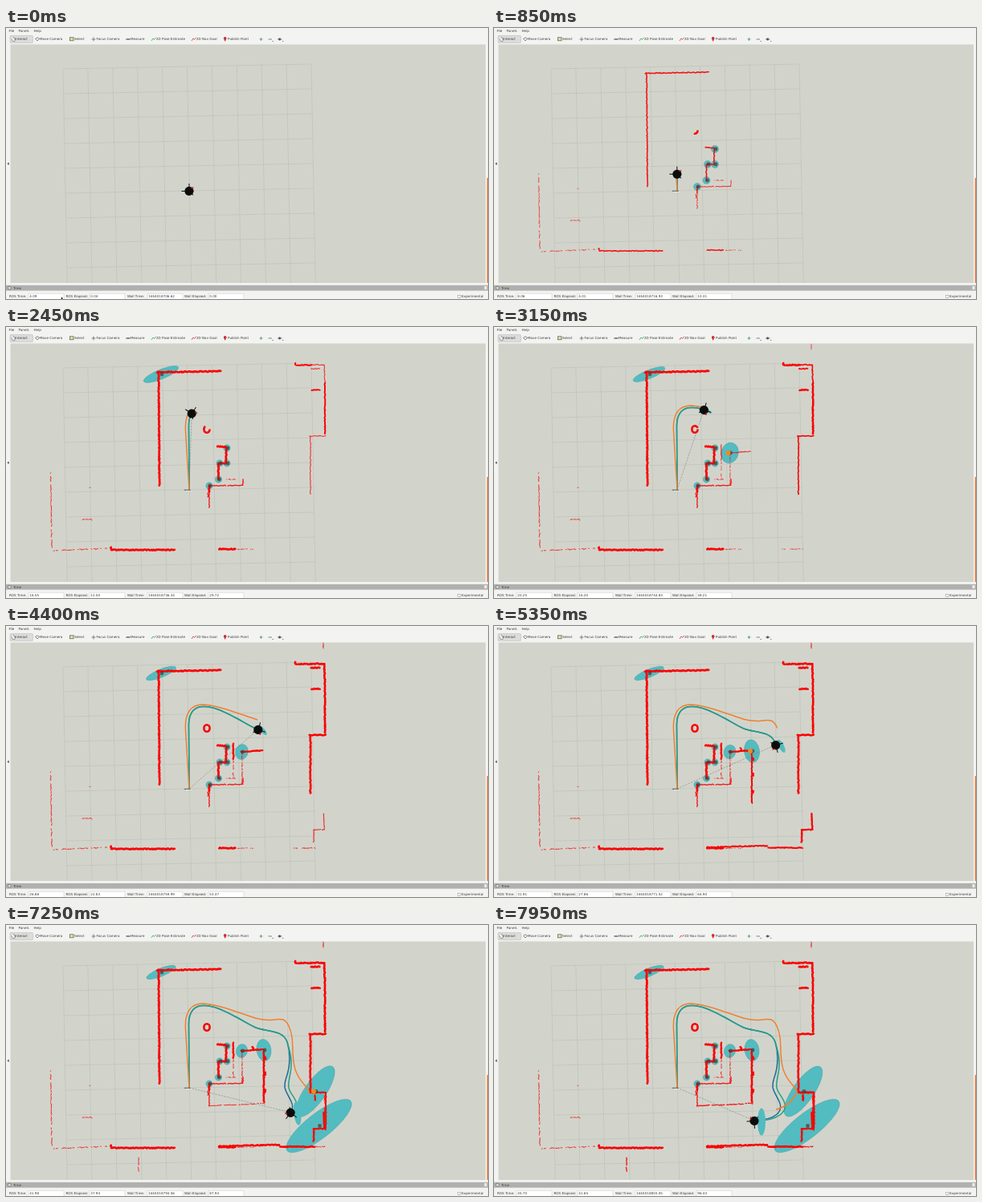
An HTML page that plays this animation: 600x338 px, repeating every 8000 ms.

```html
<!DOCTYPE html>
<html lang="en">
<head>
<meta charset="utf-8">
<title>Robot mapping view</title>
<style>
html, body { margin: 0; width: 100%; height: 100%; overflow: hidden; background: #f3f3f1; }
svg { display: block; width: 100vw; height: 100vh; }
text { font: 4.1px "DejaVu Sans", sans-serif; fill: #3a3a3a; text-rendering: geometricPrecision; }
</style>
</head>
<body>
<svg viewBox="0 0 600 338" preserveAspectRatio="none">
  <defs><clipPath id="view"><rect x="5.5" y="20.5" width="591.5" height="297.5"/></clipPath></defs>
  <rect width="600" height="338" fill="#f3f3f1"/>
  <rect x="5.5" y="20.5" width="591.5" height="297.5" fill="#d2d4cc"/>
  <g clip-path="url(#view)" fill="none">
    <path id="grid" stroke="#bbbfb6" stroke-width=".6"/>
    <g id="areas" fill="#52bcc0" stroke="#3f8f92" stroke-width=".3"></g>
    <g id="walls" stroke="#f80404" stroke-linecap="round"></g>
    <ellipse id="post" cx="250" cy="127.5" rx="3.6" ry="4.3" pathLength="100" stroke="#f80404" stroke-width="2.6"/>
    <g id="dots"></g>
    <path id="link" stroke="#777" stroke-width=".5" stroke-dasharray="2.5 1.2"/>
    <path d="M222 203.3H230M228 199V204" stroke="#333" stroke-width=".8"/>
    <path d="M224 204.3H231" stroke="#f4f4f0" stroke-width=".7"/>
    <g id="routes" stroke-width="1.5"></g>
    <ellipse id="pose" fill="#52bcc0"/>
    <g id="robot">
      <path d="M0 0V-9.5M0 0H-9.5M0 0L5 5" stroke="#111" stroke-width="1"/>
      <circle r="5.6" fill="#0b0d0c"/>
      <path d="M2 -4.5L5.5 -4" stroke="#c62a35" stroke-width="1.5"/>
    </g>
  </g>
  <g fill="none" stroke="#666" stroke-width=".8">
    <rect x="5" y="9.6" width="28.5" height="9" rx="1" fill="#dcdcda" stroke="#b5b5b2" stroke-width=".5"/>
    <path d="M7 13L8 16.5H11V13L9 12V11" fill="#fff" stroke-width=".6"/>
    <path d="M36.5 13.5L39 11.8L41.5 13.5L39 16Z"/>
    <rect x="79.5" y="11.8" width="4.5" height="4" fill="#e8df9b"/>
    <path d="M106.5 14H111.5M109 11.5V16.5"/>
    <path d="M149.5 14H154.5" stroke-width="1.5"/>
    <path d="M181 16L183 13L184.5 14.5L186.5 12" stroke="#22aa44"/>
    <path d="M231 16L233 13L234.5 14.5L236.5 12" stroke="#c33"/>
    <path d="M272.7 17L271 13.5A1.8 1.8 0 1 1 274.4 13.5Z" fill="#c33" stroke="none"/>
    <path d="M315.5 14H319.5M317.5 12V16" stroke="#4d8a70"/>
    <path d="M326.5 14H331M338 14H343.5M331.5 16.5H333M344 16.5H345.5"/>
    <circle cx="340.7" cy="14" r="1.2" fill="#444"/>
  </g>
  <path d="M3.6 167.5L1.5 169.2L3.6 171Z" fill="#444"/>
  <path d="M599.4 187V318" stroke="#f07030" stroke-width="1.2"/>
  <rect y="320.8" width="600" height="6.8" fill="#b0b1ae"/>
  <circle cx="4.3" cy="324.2" r="2" fill="#ddd" stroke="#555" stroke-width=".6"/>
  <rect x="595.5" y="322" width="3" height="4" fill="#ececea"/>
  <path d="M28 331.3h44v8h-44zM104 331.3h44v8h-44zM176 331.3h44v8h-44zM252 331.3h44v8h-44z" fill="#fff" stroke="#c4c4c0" stroke-width=".5"/>
  <rect x="562.3" y="333.2" width="3.5" height="3.5" fill="#fff" stroke="#888" stroke-width=".5"/>
  <g>
    <text x="3.5" y="5">File</text><text x="15.5" y="5">Panels</text><text x="34.5" y="5">Help</text>
    <text x="11" y="15.4">Interact</text><text x="42" y="15.4">Move Camera</text>
    <text x="85" y="15.4">Select</text><text x="112.5" y="15.4">Focus Camera</text>
    <text x="155" y="15.4">Measure</text><text x="187" y="15.4">2D Pose Estimate</text>
    <text x="237" y="15.4">2D Nav Goal</text><text x="276" y="15.4">Publish Point</text>
    <text x="9" y="325.7">Time</text>
    <text x="4" y="336.4">ROS Time:</text><text id="ros" x="29.3" y="336.4"></text>
    <text x="74.5" y="336.4">ROS Elapsed:</text><text id="rosElapsed" x="105.3" y="336.4"></text>
    <text x="151" y="336.4">Wall Time:</text><text id="wall" x="177.3" y="336.4"></text>
    <text x="222" y="336.4">Wall Elapsed:</text><text id="wallElapsed" x="253.3" y="336.4"></text>
    <text x="567" y="336.4">Experimental</text>
  </g>
  <path id="cursor" d="M68.8 335.4L71 337.3L69.8 338H68.8Z" fill="#111"/>
</svg>
<script>
const LOOP = 8000, STEP = 50, DEPART = 400, ARRIVE = 7950;
const $ = id => document.getElementById(id);
const clamp = k => Math.max(0, Math.min(1, k));
const show = (el, on) => el.setAttribute('visibility', on ? 'visible' : 'hidden');

function set(el, attrs) {
  for (const key in attrs) el.setAttribute(key, attrs[key]);
  return el;
}
function add(parent, tag, attrs) {
  return $(parent).appendChild(set(document.createElementNS('http://www.w3.org/2000/svg', tag), attrs));
}

let seed = 11;
function rand() {
  seed = (seed * 16807) % 2147483647;
  return seed / 2147483647;
}

// Ground grid, 10 x 10 cells
let grid = '';
for (let i = 0; i <= 10; i++) {
  grid += `M${71 + 30.9 * i} ${51 - .6 * i}l6 310M${71 + .6 * i} ${51 + 31 * i}l309 -6`;
}
$('grid').setAttribute('d', grid);

// A laser scan: rough lines that thicken over `span`; low density leaves gaps
const scans = [];
function scan(start, span, width, density, outline) {
  let d = '';
  for (const part of outline.match(/M[^M]+/g)) {
    const line = add('walls', 'path', { d: part }), len = line.getTotalLength();
    let last = '';
    for (let s = 0; s <= len; s += 1.3) {
      const p = line.getPointAtLength(s);
      const here = (p.x + rand() - .5).toFixed(1) + ' ' + (p.y + rand() - .5).toFixed(1);
      if (last && rand() < density) d += `M${last}L${here}`;
      last = here;
    }
    line.remove();
  }
  scans.push({ el: add('walls', 'path', { d }), start, span, width });
}
scan(150, 1600, 2.7, 1, 'M190 56L191 198M188 56.5L268 55M131 275V278H211M265 277H287M253 198V206M263 149L274 149.5V170H264.5V191');
scan(150, 1600, 1.4, .9, 'M253 206V226M251.5 207V213M253 198L295 197.5V189');
scan(150, 1600, .9, .6, 'M55.5 180L57 279L131 276M104 200H107M100 220V223M94 240H107V242M274 190H287M287 277H310');
scan(1000, 2300, 2.6, 1, 'M360 45V47.5H382M380 78.5H391M397 70V134');
scan(2000, 2200, 2.6, 1, 'M382 47H396L397 70M380 52H391M378 136H398M379 136V209');
scan(2700, 1600, 2.3, 1, 'M283 147V167M293 157L320 155');
scan(3000, 1600, 1, .7, 'M283 167V190M294 158V197M358 277H386M395 20V28');
scan(4000, 1400, 2.3, .95, 'M383 270V254H397M395 231L396.5 253');
scan(4700, 900, 2.5, 1, 'M265 276L341 274M341 276.5H385M307 152L308 156M321 156V221M323 165V168M323 184V187M323 206V209');
scan(6100, 800, 1.2, .7, 'M385 213V221M396.5 213V240');
scan(6800, 700, 2.7, 1, 'M379 209H398V255M384.5 213V219');
scan(6900, 700, 1.4, .7, 'M253 225.5L322 222.5M385 276.5H398M165 290V308');

// Landmarks: uncertainty shrinks after the first sighting
const marks = [];
function landmark(x, y, rx, ry, angle, start, extra) {
  marks.push({
    rx, ry, start, extra,
    area: add('areas', 'ellipse', { transform: `translate(${x} ${y}) rotate(${angle})` }),
    dot: add('dots', 'circle', { cx: x + 1, cy: y, r: 2.4, fill: '#5a3a30', 'fill-opacity': .75 }),
    seen: add('dots', 'circle', { cx: x - 2, cy: y, r: 3, fill: '#f08a1c' })
  });
}
for (const [x, y] of [[275, 151], [275, 170], [266, 170], [264.5, 190], [253, 198]]) landmark(x, y, 4.2, 4.2, 0, 200, .2);
landmark(193, 59, 19.5, 5, -22, 1100, .9);
landmark(293.5, 157, 7, 8.5, 15, 2900, .7);
landmark(321, 156, 9, 13.5, -8, 4950, .1);
landmark(389.5, 250.5, 50, 15.5, -38, 6250, .02);
landmark(385, 207.5, 37, 13, -55, 7250, .02);

// Routes are drawn at constant speed
function route(stroke, d) {
  const el = add('routes', 'path', { d, stroke });
  return { el, len: el.getTotalLength() };
}
const stem = 'M228 203L227.5 125C227 106 236 100 247 100.5C262 101 275 109 285 114S300 123 311 128S345 130 350 146';
const truth = route('#1c6a9c', stem + 'S354 175 349 190S349 207 355 220S350 243 324 244');
const estimate = route('#25a184', stem + 'S357 172 353 190S355 207 361 220S353 244 326 244.5');
const odometry = route('#f08030', 'M228 203L223.5 130C222 106 232 98 245 98C264 99 285 108 310 116S344 109 352 126S354 160 360 180S381 203 376 211S362 228 351 230');

function draw(t) {
  const sec = t / 1000;
  const ros = 4.09 + Math.max(0, sec - .1) * 5.3, wall = sec * 12.13;
  $('ros').textContent = ros.toFixed(2);
  $('rosElapsed').textContent = (ros - 4.05).toFixed(2);
  $('wall').textContent = (1654018706.62 + wall).toFixed(2);
  $('wallElapsed').textContent = wall.toFixed(2);
  show($('cursor'), t < DEPART);

  for (const { el, start, span, width } of scans) {
    const w = .7 + (width - .7) * clamp((t - start) / span);
    set(el, { 'stroke-width': w, opacity: Math.min(1, .45 + w * .3) });
    show(el, t >= start);
  }
  const arc = 25 + 75 * clamp(t / 3300) ** 2;
  set($('post'), { 'stroke-dasharray': `${arc} 100` });
  show($('post'), t >= 150);

  for (const { area, dot, seen, rx, ry, start, extra } of marks) {
    const age = t - start, k = 1 + extra * Math.exp(-age / 900);
    set(area, { rx: rx * k, ry: ry * k });
    show(area, age >= 0);
    show(dot, age >= 0);
    show(seen, start > 2000 && age >= 0 && age < 600);
  }

  const p = clamp((t - DEPART) / (ARRIVE - DEPART));
  for (const { el, len } of [truth, estimate, odometry]) {
    el.setAttribute('stroke-dasharray', `${len * p} ${len + 9}`);
    show(el, p > 0);
  }
  const s = truth.len * p, point = d => truth.el.getPointAtLength(s + d);
  const { x, y } = point(0), back = point(-3), ahead = point(3);
  const turn = Math.atan2(ahead.y - back.y, ahead.x - back.x) * 180 / Math.PI + 90;
  $('robot').setAttribute('transform', `translate(${x} ${y + .4}) rotate(${turn})`);
  $('link').setAttribute('d', `M228 203L${x} ${y}`);
  set($('pose'), { rx: 5 * p, ry: 3 + 14 * p * p, transform: `translate(${x + 3 + 6 * p} ${y + 1.5}) rotate(${80 * (p - 1)})` });
  show($('pose'), p > .35);
}

function tick() {
  draw(Math.floor(performance.now() % LOOP / STEP) * STEP);
  requestAnimationFrame(tick);
}
tick();
</script>
</body>
</html>
```
